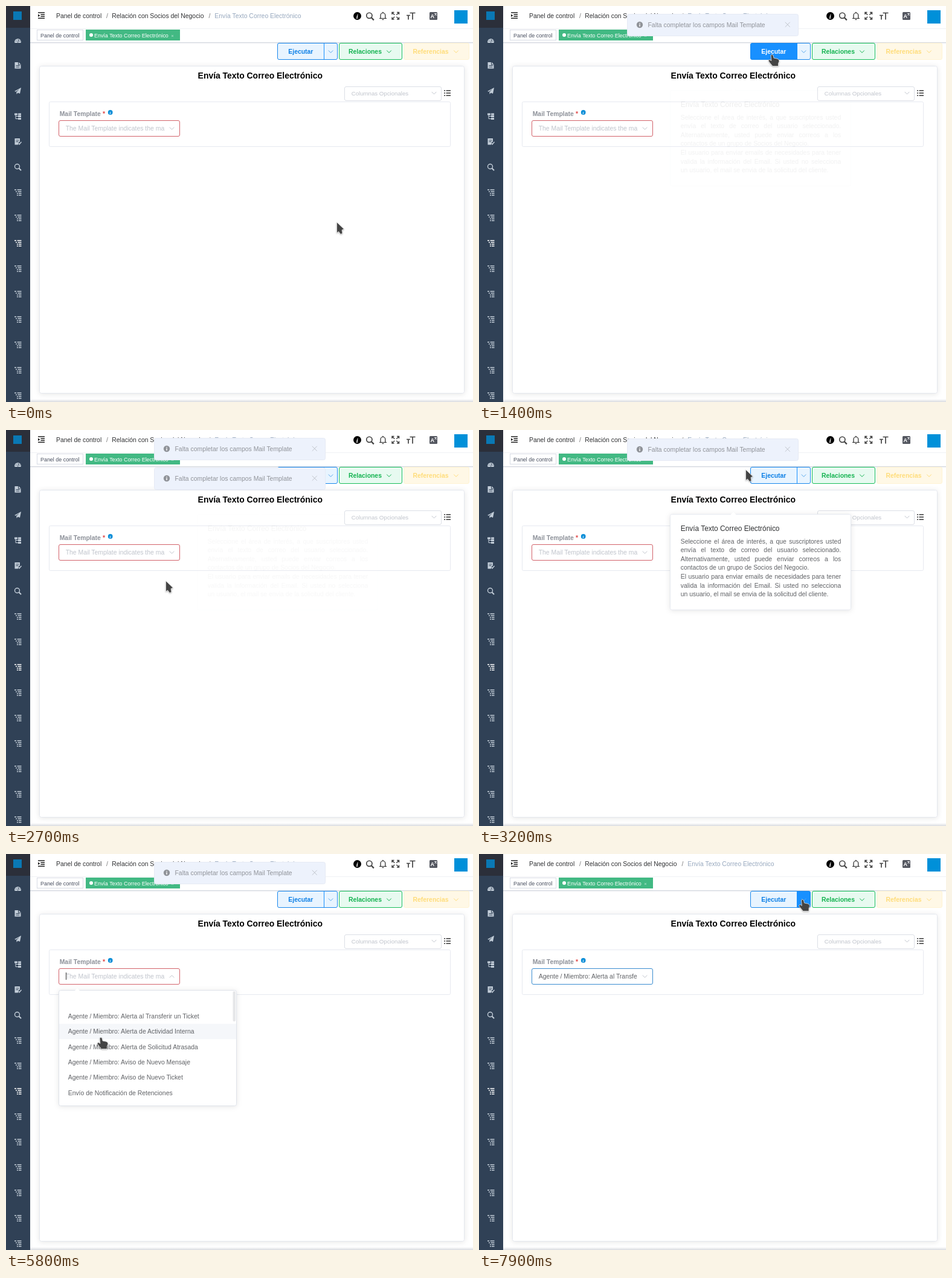
An HTML page for the animation above (8 s loop, 773x655 px).

```html
<!DOCTYPE html>
<html lang="es">
<head>
<meta charset="utf-8">
<style>
html, body { margin: 0; width: 100%; height: 100%; overflow: hidden; background: #fff; }
svg { display: block; width: 773px; height: 655px; font: 10.42px "Liberation Sans", Arial, sans-serif; }
.bold { font-weight: bold; }
.small { font-size: 8.93px; }
.line { fill: none; stroke-linecap: round; stroke-linejoin: round; }
.shade { filter: drop-shadow(0 1px 4px rgba(0, 0, 0, .1)); }
.body { color: #606266; line-height: 14.58px; }
.body div { text-align-last: justify; }
.body .end { text-align-last: left; }
</style>
</head>
<body>
<svg viewBox="0 0 773 655" xmlns="http://www.w3.org/2000/svg">
  <defs>
    <path id="chevron" class="line" d="M-3.5-1.7 0 1.8 3.5-1.7"/>
    <g id="menu"><path d="M0 .5h3M4.500 .5h7M2 3.500h2M5.500 3.500h6M4 6.500h2M7 6.500h4.500M4 9.500h2M7 9.500h4.500" fill="none" stroke="currentColor" stroke-width="1.3"/></g>
    <g id="glass" fill="none" stroke="currentColor"><circle cx="-1" cy="-1" r="4"/><path d="M2 2 5.500 5.500" stroke-width="2"/></g>
    <g id="notice">
      <rect x="245.500" y=".5" width="283" height="36" rx="3" fill="#edf2fc" stroke="#e6eaf4"/>
      <circle cx="266" cy="18" r="5.200" fill="#909399"/>
      <path d="M266 15v1.200M266 17.300v3.700" stroke="#fff" stroke-width="1.400"/>
      <text x="279.500" y="21.700" fill="#909399">Falta completar los campos Mail Template</text>
      <path class="line" d="m507 14 7.500 7.500m0-7.500-7.500 7.500" stroke="#c0c4cc"/>
    </g>
    <linearGradient id="foot" x2="0" y2="1"><stop stop-color="#fff"/><stop offset="1" stop-color="#d9dbe0"/></linearGradient>
  </defs>

  <rect width="773" height="655" fill="#fff"/>
  <rect y="650" width="773" height="5" fill="url(#foot)"/>

  <!-- header -->
  <path d="M40 37.500h733" stroke="#f0f1f4"/>
  <path d="M40 60.500h733" stroke="#d3d7df"/>
  <path d="M40 61.500h733" stroke="#f0f1f4"/>
  <path d="M53 11h11M57.500 14.200H64M57.500 17.200H64M53 20.300h11" stroke="#222" stroke-width="1.500"/>
  <path d="m53 13.500 3.500 2.200-3.500 2.200z" fill="#222"/>
  <g fill="#303133">
    <text x="83" y="20">Panel de control</text>
    <text x="175.300" y="20">Relación con Socios del Negocio</text>
    <g fill="#97a8be"><text x="345.300" y="20">Envía Texto Correo Electrónico</text></g>
    <g fill="#777"><text x="166" y="20">/</text><text x="335.500" y="20">/</text></g>
  </g>
  <circle cx="581.500" cy="16.500" r="6.500" fill="#000"/>
  <text x="579.700" y="20.700" fill="#fff" style="font:italic bold 11px 'Liberation Serif',serif">i</text>
  <use href="#glass" transform="translate(602.500 17) scale(1.150)" color="#444" stroke-width="1.500"/>
  <path class="line" d="M618.500 20.500h11M620 20v-4.500a3.900 4 0 0 1 7.800 0V20M623.900 10v1.500M622.700 22.500h2.400" stroke="#222" stroke-width="1.200"/>
  <path d="M639 14v-3.500h3.500M647 10.500h3.500V14M650.500 18.500V22H647M642.500 22H639v-3.500M639.500 11l3.700 3.700M650 11l-3.700 3.700M650 21.500l-3.700-3.700M639.500 21.500l3.700-3.700" fill="none" stroke="#444" stroke-width="1.500"/>
  <path d="M668.500 11.500h9M673 11.500v11M663 15.500h6M666 15.500v7" stroke="#444" stroke-width="1.700"/>
  <rect x="701" y="10" width="13" height="13" rx="1.500" fill="#555861"/>
  <text x="702.500" y="20" class="bold" fill="#fff" style="font-size:9px">A</text>
  <path d="M709 12.500h4M709.500 16l3-3.500M710 12.500l3 3.500" stroke="#fff" stroke-width=".8"/>
  <rect x="742" y="7" width="22" height="22" fill="#0090d9"/>

  <!-- tabs -->
  <rect x="51.500" y="39.500" width="76" height="17" fill="#fff" stroke="#d8dce5"/>
  <text x="57" y="52" class="small" fill="#495060">Panel de control</text>
  <rect x="132" y="39" width="156" height="18" fill="#42b983"/>
  <circle cx="141" cy="48" r="3" fill="#fff"/>
  <text x="146" y="52" class="small" fill="#fff">Envía Texto Correo Electrónico</text>
  <path d="m274 48 3 3m0-3-3 3" stroke="#c4ead9" stroke-width=".8"/>

  <!-- actions -->
  <rect x="449.500" y="61.500" width="99" height="27" rx="2.500" fill="#e8f4ff"/>
  <path id="runFill" d="M452 61.500h74.500v27H452q-2.500 0-2.500-2.500V64q0-2.500 2.500-2.500" fill="#1890ff"/>
  <path id="moreFill" d="M526.500 61.500H546q2.500 0 2.500 2.500v22q0 2.500-2.500 2.500h-19.500z" fill="#1890ff"/>
  <path d="M526.500 62v26" stroke="#1890ff"/>
  <rect x="449.500" y="61.500" width="99" height="27" rx="2.500" fill="none" stroke="#1887ec"/>
  <text id="run" x="467.300" y="79" class="bold">Ejecutar</text>
  <use href="#chevron" x="537.500" y="75.500" stroke="#5aa9ee"/>
  <rect x="551.500" y="61.500" width="104" height="27" rx="2.500" fill="#e7faf0" stroke="#19bd5a"/>
  <text x="567" y="79" class="bold" fill="#13b350">Relaciones</text>
  <use href="#chevron" x="634" y="75.500" stroke="#13b350"/>
  <rect x="658.500" y="61.500" width="108" height="27" rx="2.500" fill="#fff8e6" stroke="#fff3d2"/>
  <text x="673.500" y="79" class="bold" fill="#ffdc79">Referencias</text>
  <use href="#chevron" x="745" y="75.500" stroke="#ffdc79"/>

  <!-- form -->
  <rect x="55.500" y="99.500" width="703" height="541" rx="3" fill="#fff" stroke="#e4e7ee" class="shade"/>
  <text x="317.600" y="120" class="bold" style="font-size:13.930px">Envía Texto Correo Electrónico</text>
  <rect x="560.500" y="133.500" width="160" height="23" rx="2.500" fill="#fff" stroke="#dcdfe6"/>
  <text x="571.700" y="148.200" fill="#c0c4cc" style="font-size:9.670px">Columnas Opcionales</text>
  <use href="#chevron" x="708.500" y="144" stroke="#c0c4cc"/>
  <path d="M725 140h2m1.500 0h7.500M725 144h2m1.500 0h7.500M725 148h2m1.500 0h7.500" stroke="#333" stroke-width="1.600"/>
  <rect x="71.500" y="158.500" width="664" height="74" rx="2" fill="none" stroke="#e6e9f0"/>
  <text x="88.700" y="182" class="bold" fill="#8d9199">Mail Template</text>
  <text x="160" y="182" class="bold" fill="#e04848">*</text>
  <circle cx="172.700" cy="176" r="3.900" fill="#0b8fd8"/>
  <text x="171.600" y="178.500" fill="#fff" style="font:italic bold 6.500px 'Liberation Serif',serif">i</text>
  <rect id="field" x="87.500" y="189.500" width="200" height="26" rx="2.500" fill="#fff"/>
  <text id="value" x="98.700" y="206"></text>
  <path id="caret" d="M99.500 196v12" stroke="#333"/>
  <use id="arrow" href="#chevron" stroke="#c0c4cc"/>

  <!-- option list -->
  <g id="list">
    <g class="shade"><rect x="87.500" y="225.500" width="294" height="191" rx="3" fill="#fff" stroke="#dfe3ea"/></g>
    <path d="m113.500 226.500 4.500-4.500 4.500 4.500z" fill="#fff"/>
    <rect id="hover" x="88" width="293" height="25.400" fill="#f5f7fa"/>
    <rect x="375.500" y="227" width="4.500" height="50" rx="2.200" fill="#e6e7e9"/>
    <g id="options" fill="#606266"></g>
  </g>

  <!-- help popover -->
  <g id="help">
    <rect x="316.500" y="139.500" width="299" height="158" rx="3" fill="#fff" stroke="#e6e9f0" class="shade"/>
    <path d="m416.500 140 4.500-4.500 4.500 4.500z" fill="#fff"/>
    <text x="333.800" y="167" fill="#303133" style="font-size:11.900px">Envía Texto Correo Electrónico</text>
    <foreignObject x="333.800" y="177.700" width="265.400" height="110">
      <div xmlns="http://www.w3.org/1999/xhtml" class="body">
        <div>Seleccione el área de interés, a que suscriptores usted</div>
        <div>envía el texto de correo del usuario seleccionado.</div>
        <div>Alternativamente, usted puede enviar correos a los</div>
        <div class="end">contactos de un grupo de Socios del Negocio.</div>
        <div>El usuario para enviar emails de necesidades para tener</div>
        <div>valida la información del Email. Si usted no selecciona</div>
        <div class="end">un usuario, el mail se envia de la solicitud del cliente.</div>
      </div>
    </foreignObject>
  </g>

  <use id="notice1" href="#notice"/>
  <use id="notice2" href="#notice"/>

  <!-- sidebar -->
  <rect width="40" height="655" fill="#304156"/>
  <rect width="40" height="36" fill="#2b2f3a"/>
  <rect x="12" y="9" width="14" height="14" fill="#0a78b4"/>
  <g id="side" color="#c3ced9" fill="#c3ced9">
    <path d="M14.500 61a5.300 5.300 0 1 1 10 0z"/>
    <path d="M19.500 60.500 21 55M16 58h1.500M22 58h1.500M17.500 54.500l1 1" stroke="#304156"/>
    <path d="M14.500 93h6.500l3.500 3.500v7h-10z"/>
    <path d="M16.500 98.500h6M16.500 101h6M20.500 93v4h4" stroke="#304156" fill="none"/>
    <path d="m14 141 11-6-2 10-3.500-1.500-1.800 2.500-.5-3.500 5-5-6 4.200z"/>
    <path d="M14 177.500h5v3h-5zM20 177.500h5v3h-5zM20 181h5v3h-5zM20 185h5v3h-5z"/>
    <path d="M16 180v6.500h4M16 182.500h4" fill="none" stroke="#c3ced9"/>
    <path d="M14.500 219h8.500v5l-3 3v2.500h-5.500z"/>
    <path d="M16.500 222h5M16.500 224.500h4" stroke="#304156"/>
    <path d="m20.500 227 1.500 1.800 3.500-4" fill="none" stroke="#c3ced9" stroke-width="1.400"/>
    <use href="#glass" x="19.500" y="266.500" stroke-width="1.400"/>
  </g>

  <g id="cursor" stroke="#fff" stroke-width=".7" fill="#444" style="filter:drop-shadow(.5px 1px 1px rgba(0,0,0,.3))">
    <path id="arrowShape" d="M-.5-.5 11.500 11 8 12.500 9 18 6 19.500 2.500 15-.5 17.500z"/>
    <path id="handShape" d="M-2 1.500Q0-1 2 1.500L3 6l6 1.200q3 1 3 4L10.500 15v4.500H1L-4 13.500-6 10.500Q-5 8-3 9l1.800 1.500z"/>
    <path id="beamShape" d="M-3-6.500H-1L0-6 1-6.500H3M0-6V6M-3 6.500H-1L0 6 1 6.500H3" fill="none" stroke="#222" stroke-width="1.300"/>
  </g>
</svg>
<script>
const $ = id => document.getElementById(id);
const set = (id, attrs) => { for (const k in attrs) $(id).setAttribute(k, attrs[k]); };

const options = ['Alerta al Transferir un Ticket', 'Alerta de Actividad Interna', 'Alerta de Solicitud Atrasada',
  'Aviso de Nuevo Mensaje', 'Aviso de Nuevo Ticket'].map(s => 'Agente / Miembro: ' + s);
options.push('Envío de Notificación de Retenciones');
const ROW = 25.4, FIRST = 255.4;
$('options').innerHTML = options.map((s, i) =>
  `<text x="102.700" y="${FIRST + ROW * i + 16.4}">${s}</text>`).join('');

for (let y = 308; y < 655; y += 42)
  $('side').insertAdjacentHTML('beforeend',
    `<use href="#menu" x="14" y="${y - 4.5}" color="${y === 392 ? '#fff' : '#c3ced9'}"/>`);

// time, x, y and shape (a: arrow, h: hand, i: text beam)
const path = [
  [0, 548, 358, 'a'], [300, 520, 200, 'a'], [500, 500, 118, 'a'], [700, 490, 95, 'a'], [800, 486, 83, 'h'],
  [900, 485, 80, 'h'], [1500, 485, 80, 'h'], [1600, 585, 85, 'h'], [1700, 550, 115, 'a'], [1800, 470, 142, 'i'],
  [2000, 431, 210.5, 'i'], [2200, 380, 405, 'a'], [2400, 300, 240, 'a'], [2600, 300, 240, 'a'], [2800, 230, 260, 'a'],
  [2900, 230, 260, 'a'], [3000, 330, 190, 'a'], [3100, 400, 118, 'a'], [3200, 442, 66, 'a'], [3300, 442, 66, 'a'],
  [3700, 350, 38, 'a'], [3900, 350, 30, 'a'], [4200, 410, 20, 'a'], [4500, 475, 33, 'a'], [4600, 475, 33, 'a'],
  [4700, 475, 100, 'a'], [4800, 455, 240, 'a'], [4900, 380, 348, 'a'], [5000, 260, 270, 'a'], [5100, 172, 205, 'h'],
  [5400, 165, 221, 'h'], [5500, 165, 221, 'h'], [5600, 160, 260, 'h'], [5800, 157, 303, 'h'], [6000, 157, 304, 'h'],
  [6100, 172, 290, 'h'], [6200, 172, 290, 'h'], [6400, 160, 268, 'h'], [6700, 160, 268, 'h'], [6800, 200, 320, 'a'],
  [7000, 350, 372, 'a'], [7200, 540, 330, 'a'], [7400, 638, 180, 'a'], [7500, 573, 105, 'a'], [7600, 573, 105, 'a'],
  [7800, 539, 80, 'h'], [7900, 535.5, 75, 'h'], [8000, 535, 75, 'h']];

// piecewise linear value from [time, value] pairs, flat outside them
function ramp(t, keys, col = 1) {
  if (t <= keys[0][0]) return keys[0][col];
  const i = keys.findIndex(k => k[0] >= t);
  if (i < 0) return keys[keys.length - 1][col];
  const a = keys[i - 1], b = keys[i];
  return a[col] + (b[col] - a[col]) * (t - a[0]) / (b[0] - a[0]);
}

const helpFade = [[300, 0], [500, 1], [600, 1], [800, .25], [900, .08], [2600, .08], [2800, 0], [3000, 0], [3200, 1],
  [3300, 1], [3500, .25], [3700, 0], [4700, 0], [4800, .5], [4900, .3], [5100, 0]];

function draw(t) {
  const x = ramp(t, path, 1), y = ramp(t, path, 2);
  const shape = path.filter(k => k[0] <= t).pop()[3];
  set('cursor', { transform: `translate(${x} ${y})` });
  set('arrowShape', { visibility: shape === 'a' ? 'visible' : 'hidden' });
  set('handShape', { visibility: shape === 'h' ? 'visible' : 'hidden' });
  set('beamShape', { visibility: shape === 'i' ? 'visible' : 'hidden' });

  const onRun = t >= 800 && t < 1600;
  set('runFill', { opacity: +onRun });
  set('run', { fill: onRun ? '#fff' : '#0c7fe6' });
  set('moreFill', { opacity: +(t >= 7800) });

  const chosen = t >= 6600, open = t >= 5300 && !chosen;
  set('field', { stroke: chosen ? '#3a8cd0' : '#d2626a' });
  set('value', { fill: chosen ? '#606266' : '#c0c4cc' });
  $('value').textContent = chosen ? options[0].slice(0, 35) : 'The Mail Template indicates the ma';
  set('caret', { opacity: +(t >= 5300 && t < 6100) });
  set('arrow', { transform: `translate(274.500 202.500) scale(1 ${open ? -1 : 1})` });

  const unfold = ramp(t, [[5500, 0], [5700, 1], [6600, 1], [6800, 0]]);
  set('list', { opacity: unfold, transform: `translate(0 ${225 * (1 - unfold)}) scale(1 ${unfold})` });
  const row = Math.floor((y - FIRST) / ROW);
  set('hover', { y: FIRST + ROW * row, opacity: +(row >= 0 && row < options.length) });

  set('help', { opacity: ramp(t, helpFade) });

  set('notice1', {
    y: ramp(t, [[900, -24], [1200, 13], [2900, 13], [3200, -24]]),
    opacity: ramp(t, [[900, 0], [1200, 1], [2900, 1], [3200, 0]])
  });
  set('notice2', {
    y: ramp(t, [[1400, 25], [1700, 62], [2900, 62], [3200, 14], [3300, 13], [6500, 13], [6900, -24]]),
    opacity: ramp(t, [[1400, 0], [1700, 1], [6500, 1], [6900, 0]])
  });
}

function tick() {
  draw(Math.floor(performance.now() % 8000 / 100) * 100);
  requestAnimationFrame(tick);
}
tick();
</script>
</body>
</html>
```
